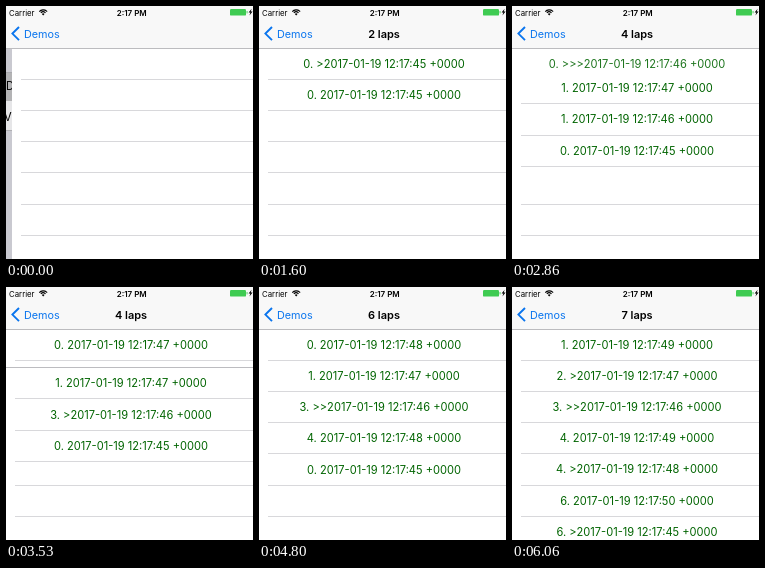
These frames come from a looping animation (247x253 px, 6160 ms). An HTML page with a canvas:

```html
<!DOCTYPE html>
<html lang="en">
<head>
<meta charset="utf-8">
<title>Laps</title>
<style>
html, body { margin: 0; width: 100%; height: 100%; overflow: hidden; background: #fff; }
canvas { display: block; width: 247px; height: 253px; }
</style>
</head>
<body>
<canvas id="stage"></canvas>
<script>
const W = 247, H = 253, LOOP = 6160;
const TOP = 42, ROW = 31.2, MID = 125;
const FACE = 'Inter, "Liberation Sans", sans-serif';
const canvas = document.getElementById('stage');
const ctx = canvas.getContext('2d');
const dpr = window.devicePixelRatio || 1;
canvas.width = W * dpr;
canvas.height = H * dpr;

// Each step: start, duration, lap count in the title, rows afterwards
// (key letter, label, seconds).
const steps = [
  [0, 1, 0, ''],
  [180, 320, 1, 'a0. 45'],
  [700, 600, 2, 'b0. 45|a0. 45'],
  [1370, 220, 2, 'b0. >45|a0. 45'],
  [1760, 370, 3, 'b0. >45|c1. 46|a0. 45'],
  [2130, 250, 3, 'b0. >>46|c1. 46|a0. 45'],
  [2430, 170, 4, 'b1. 47|c1. 46|a0. 45'],
  [2600, 370, 4, 'd0. >>>46|b1. 47|c1. 46|a0. 45'],
  [3230, 155, 4, 'e0. 47|d0. >>>46|b1. 47|c3. >46|a0. 45'],
  [3385, 215, 4, 'e0. 47|b1. 47|c3. >46|a0. 45'],
  [3900, 330, 6, 'h0. 48|e0. 47|b1. 47|c3. >>46|a0. 45'],
  [4255, 280, 6, 'h0. 48|e0. 47|b1. 47|c3. >>46|f4. 48|a0. 45'],
  [4570, 240, 6, 'h0. 48|b1. 47|c3. >>46|f4. 48|a0. 45'],
  [4810, 250, 6, 'h0. 48|i1. 49|b2. >47|c3. >>46|f4. >48|a0. 45'],
  [5215, 370, 7, 'h0. 48|i1. 49|b2. >47|c3. >>46|g4. 49|f4. >48|a6. >45'],
  [5750, 310, 7, 'i1. 49|b2. >47|c3. >>46|g4. 49|f4. >48|j6. 50|a6. >45']
].map(([at, dur, count, list]) => ({
  at, dur, count, rows: list ? list.split('|').map(parseRow) : []
}));

function parseRow(spec) {
  return {
    key: spec[0],
    text: `${spec.slice(1, -2)}2017-01-19 12:17:${spec.slice(-2)} +0000`
  };
}

const clamp = v => Math.max(0, Math.min(1, v));
const ease = t => t * t * (3 - 2 * t);
const mix = (a, b, p) => a + (b - a) * p;
const find = (rows, key) => rows.findIndex(r => r.key === key);

function box(x, y, w, h, color) {
  ctx.fillStyle = color;
  ctx.fillRect(x, y, w, h);
}

function label(text, x, y, size, color, align = 'left', weight = 400) {
  ctx.font = `${weight} ${size}px ${FACE}`;
  ctx.textAlign = align;
  ctx.fillStyle = color;
  ctx.fillText(text, x, y);
}

function separator(pos, x = 9, color = '#d8d8db') {
  box(x, Math.floor(TOP + ROW * (pos + 1)), W, 1, color);
}

function drawText(text, pos, alpha = 1) {
  ctx.globalAlpha = alpha;
  label(text, MID, TOP + ROW * pos + 19.6, 11.1, '#006400', 'center');
  ctx.globalAlpha = 1;
}

function drawRow(text, pos, ...line) {
  box(0, TOP + ROW * pos + 1, W, ROW, '#fff');
  separator(pos, ...line);
  drawText(text, pos);
}

function drawTable(t, i) {
  const { at, dur, rows } = steps[i];
  const before = i ? steps[i - 1].rows : [];
  const p = ease(clamp((t - at) / dur));
  const steady = [];

  for (let n = rows.length; n < 7; n++) separator(n);

  // Removed rows fade at the top, or tuck under the row above.
  if (p < 1) before.forEach((row, n) => {
    if (find(rows, row.key) >= 0) return;
    if (n === 0) drawText(row.text, n, 1 - p);
    else drawRow(row.text, mix(n, find(rows, before[n - 1].key), p), 0, '#bcbcc0');
  });

  // Changed rows cross-fade, with the new text already in place.
  rows.forEach((row, n) => {
    const from = find(before, row.key);
    if (from >= 0 && before[from].text === row.text) {
      steady.push([row.text, mix(from, n, p)]);
    } else if (from >= 0 || n === 0) {
      if (from >= 0 && p < 1) drawText(before[from].text, mix(from, n, p), 1 - p);
      separator(n);
      drawText(row.text, n, Math.sqrt(p));
    }
  });

  // New rows emerge from beneath the row above.
  rows.forEach((row, n) => {
    if (n > 0 && find(before, row.key) < 0) {
      drawRow(row.text, mix(find(before, rows[n - 1].key), n, p));
    }
  });
  steady.forEach(item => drawRow(...item));
}

function drawMenu() {
  box(0, TOP, 12, H - TOP, '#c9c9d0');
  box(0, 66, 12, 29, '#b3b3b5');
  box(0, 95, 12, 29, '#e6e6e8');
  box(0, 66, 12, 1, '#a9a9ad');
  box(0, 124, 12, 1, '#b0b0b4');
  label('D', 0, 84, 11.1, '#000');
  label('V', -2, 115, 11.1, '#000');
}

function drawWifi() {
  ctx.strokeStyle = '#000';
  ctx.lineWidth = 1.2;
  for (const r of [3.1, 5.2]) {
    ctx.beginPath();
    ctx.arc(37.2, 9, r, -Math.PI * 0.77, -Math.PI * 0.23);
    ctx.stroke();
  }
  ctx.fillStyle = '#000';
  ctx.beginPath();
  ctx.moveTo(37.2, 9.4);
  ctx.arc(37.2, 9.2, 1.8, -Math.PI * 0.77, -Math.PI * 0.23);
  ctx.fill();
}

function drawBattery() {
  ctx.fillStyle = '#3fcb52';
  ctx.beginPath();
  ctx.roundRect(224, 3, 16, 6.6, 1.2);
  ctx.fill();
  box(240.6, 5, 0.9, 2.4, '#3fcb52');
  ctx.fillStyle = '#000';
  ctx.beginPath();
  [[245.6, 2.7], [242.6, 6.6], [244.4, 6.6], [243.4, 9.6], [246.6, 5.5], [244.8, 5.5]]
    .forEach(([x, y]) => ctx.lineTo(x, y));
  ctx.fill();
}

function drawBar(count) {
  box(0, 0, W, TOP, '#f8f8f8');
  box(0, TOP, W, 1, '#bcbcbf');
  label('Carrier', 3, 9.5, 7.8, '#000');
  drawWifi();
  label('2:17 PM', 125.7, 9.5, 8, '#000', 'center', 600);
  drawBattery();

  ctx.strokeStyle = '#0a75ee';
  ctx.lineWidth = 1.9;
  ctx.beginPath();
  ctx.moveTo(13, 21);
  ctx.lineTo(6.4, 27.6);
  ctx.lineTo(13, 34.2);
  ctx.stroke();
  label('Demos', 18, 31.6, 10.8, '#0a75ee');

  if (count) label(`${count} laps`, MID, 31.6, 11, '#000', 'center', 600);
}

function draw(t) {
  let i = steps.length - 1;
  while (i > 0 && steps[i].at > t) i--;

  ctx.setTransform(dpr, 0, 0, dpr, 0, 0);
  box(0, 0, W, H, '#fff');
  const shift = 6 * (1 - clamp((t - 40) / 150)) ** 2;
  if (shift > 0) drawMenu();
  ctx.save();
  ctx.translate(shift, 0);
  box(0, TOP, W, H - TOP, '#fff');
  drawTable(t, i);
  ctx.restore();
  drawBar(steps[i].count);
}

const start = performance.now();
function tick() {
  draw((performance.now() - start) % LOOP);
  requestAnimationFrame(tick);
}
tick();
</script>
</body>
</html>
```
